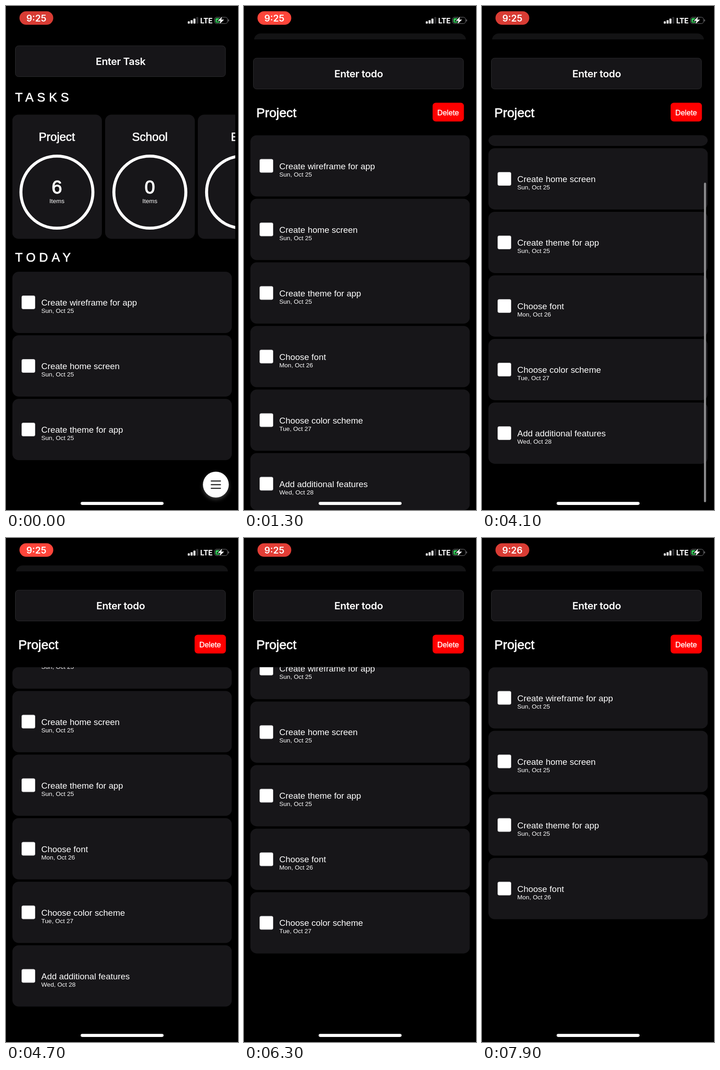
Recreate the animation shown at these times as an HTML page with a canvas. Size 508 by 1102 pixels, loop 8000 ms.

```html
<!DOCTYPE html>
<html lang="en">
<head>
<meta charset="utf-8">
<title>Todo app</title>
<style>
html, body { margin: 0; width: 100%; height: 100%; overflow: hidden; background: #000; }
canvas { display: block; }
</style>
</head>
<body>
<canvas id="stage" width="508" height="1102"></canvas>
<script>
const W = 508, H = 1102, LOOP = 8000;
const ctx = document.getElementById('stage').getContext('2d');
const SANS = '"Liberation Sans", Arial, sans-serif';
const UI = 'Inter, sans-serif';
const PANEL = '#171619', WHITE = '#fff';
const LIST_TOP = 282.5, PITCH = 139, MAX_SCROLL = 87, PEAK_SCROLL = 112;
const MODAL_TOP = 73;

const todos = [
  ['Create wireframe for app', 'Sun, Oct 25'],
  ['Create home screen', 'Sun, Oct 25'],
  ['Create theme for app', 'Sun, Oct 25'],
  ['Choose font', 'Mon, Oct 26'],
  ['Choose color scheme', 'Tue, Oct 27'],
  ['Add additional features', 'Wed, Oct 28']
];
// Start time of each row's swipe, by row index
const swipeStart = { 5: 6000, 4: 7350 };
const SWIPE_TIME = 300;

const progress = (t, from, to) => Math.min(1, Math.max(0, (t - from) / (to - from)));
const easeOut = (p, power = 3) => 1 - (1 - p) ** power;
const easeInOut = p => p * p * (3 - 2 * p);
const mix = (a, b, p) => a + (b - a) * p;

function box(x, y, w, h, r, fill, stroke) {
  ctx.beginPath();
  ctx.roundRect(x, y, w, h, r);
  if (fill) { ctx.fillStyle = fill; ctx.fill(); }
  if (stroke) { ctx.strokeStyle = stroke; ctx.lineWidth = 1; ctx.stroke(); }
}

function clipBox(x, y, w, h, r) {
  ctx.beginPath();
  ctx.roundRect(x, y, w, h, r);
  ctx.clip();
}

// `heavy` is the outline width that turns regular type into medium
function text(str, x, y, size, { align = 'left', heavy = 0, spacing = 0, font = SANS, weight = 400 } = {}) {
  ctx.font = `${weight} ${size}px ${font}`;
  ctx.textAlign = align;
  ctx.letterSpacing = spacing + 'px';
  ctx.fillStyle = ctx.strokeStyle = WHITE;
  ctx.fillText(str, x, y);
  if (heavy) {
    ctx.lineWidth = heavy;
    ctx.lineJoin = 'round';
    ctx.strokeText(str, x, y);
  }
  ctx.letterSpacing = '0px';
}

function inputButton(label, y) {
  box(20.5, y + 0.5, 460, 67.5, 7, '#161518', '#2b2b2d');
  text(label, 251, y + 42.7, 22, { align: 'center', font: UI, weight: 600, spacing: -0.3 });
}

function todoCard([title, date], y, x = 14) {
  box(x, y, 480.5, 134, 14, PANEL);
  box(x + 20.5, y + 52.5, 29, 29, 3, WHITE, '#c9c9cb');
  text(title, x + 63.3, y + 74, 18.96);
  text(date, x + 63.3, y + 90, 13.55);
}

function categoryCard(name, count, x) {
  const cx = x + 98;
  box(x, 237.5, 196.5, 271.5, 14, PANEL);
  text(name, cx, 294.5, 25.5, { align: 'center', heavy: 0.7 });
  ctx.beginPath();
  ctx.arc(cx, 407, 78.8, 0, Math.PI * 2);
  ctx.strokeStyle = WHITE;
  ctx.lineWidth = 6.6;
  ctx.stroke();
  text(count, cx, 409.5, 41, { align: 'center', heavy: 1.3 });
  text('Items', cx, 431, 13.55, { align: 'center' });
}

function menuButton() {
  ctx.save();
  ctx.shadowColor = 'rgba(255,255,255,0.25)';
  ctx.shadowBlur = 8;
  ctx.shadowOffsetY = 4;
  ctx.beginPath();
  ctx.arc(459.5, 1046.5, 28.3, 0, Math.PI * 2);
  ctx.fillStyle = WHITE;
  ctx.fill();
  ctx.restore();
  for (let i = 0; i < 3; i++) box(448.5, 1037.5 + i * 8, 22, 2.2, 0, '#111');
}

function home() {
  inputButton('Enter Task', 86.5);
  text('TASKS', 20, 209, 27, { heavy: 0.7, spacing: 7.8 });
  ctx.save();
  clipBox(14, 230, 488, 290, 0);
  categoryCard('Project', '6', 13.5);
  categoryCard('School', '0', 217);
  categoryCard('East', '0', 420);
  ctx.restore();
  text('TODAY', 20, 559, 27, { heavy: 0.7, spacing: 7.8 });
  todos.slice(0, 3).forEach((todo, i) => todoCard(todo, 581 + i * PITCH));
  menuButton();
}

function scrollAt(t) {
  if (t < 4050) return PEAK_SCROLL * easeInOut(progress(t, 3650, 4050));
  if (t < 6200) return mix(PEAK_SCROLL, MAX_SCROLL, easeInOut(progress(t, 4050, 4400)));
  return MAX_SCROLL * (1 - easeInOut(progress(t, 6200, 6500)));
}

function scrollBar(t, scroll) {
  const alpha = Math.min(progress(t, 3650, 3750), 1 - progress(t, 4300, 4490));
  if (alpha <= 0) return;
  const view = H - LIST_TOP, ratio = 799 / (view + MAX_SCROLL);
  const over = Math.max(0, scroll - MAX_SCROLL);
  const top = 286 + (scroll - over) * ratio + over;
  ctx.globalAlpha = alpha;
  box(486, top, 4.6, view * ratio - over, 2.3, '#8b8b8d');
  ctx.globalAlpha = 1;
}

function todoList(t) {
  const scroll = scrollAt(t);
  ctx.save();
  clipBox(14, LIST_TOP, 480.5, H - LIST_TOP, 13);
  todos.forEach((todo, i) => {
    const start = swipeStart[i] ?? Infinity;
    if (t >= start + SWIPE_TIME + 50) return;
    const swipe = start < t ? progress(t, start, start + SWIPE_TIME) : 0;
    todoCard(todo, LIST_TOP + i * PITCH - scroll, 14 - 481 * swipe * swipe);
  });
  scrollBar(t, scroll);
  ctx.restore();
}

function modal(t) {
  box(0, MODAL_TOP, W, H, [14, 14, 0, 0], '#000');
  inputButton('Enter todo', 113.5);
  text('Project', 27, 242.5, 28.2, { heavy: 0.8 });
  box(413, 211.5, 68.5, 41, 7, '#f00');
  text('Delete', 447, 238.5, 16.4, { align: 'center', heavy: 0.4 });
  todoList(t);
}

function screens(t) {
  const open = easeOut(progress(t, 400, 1050), 4);
  const scale = mix(1, 0.9134, open);
  ctx.save();
  ctx.translate(W / 2 * (1 - scale), 60 * open);
  ctx.scale(scale, scale);
  clipBox(0, 0, W, H, 16 * open);
  if (open < 1) home();
  ctx.fillStyle = `rgba(235,235,255,${0.078 * open})`;
  ctx.fillRect(0, 0, W, H);
  ctx.restore();
  if (open > 0) {
    ctx.save();
    ctx.translate(0, (H - MODAL_TOP) * (1 - open));
    modal(t);
    ctx.restore();
  }
}

function battery() {
  box(456.5, 24.5, 28.5, 14, 4.5, null, '#77777a');
  box(458.5, 26.5, 14, 10, 2.5, '#35c759');
  box(486.5, 29, 1.8, 5, [0, 2, 2, 0], '#77777a');
  ctx.beginPath();
  [[473.5, 23], [463.5, 32.5], [469.5, 32.5], [467.5, 39.5], [477.5, 29.8], [471.3, 29.8]]
    .forEach(([x, y]) => ctx.lineTo(x, y));
  ctx.closePath();
  ctx.strokeStyle = '#000';
  ctx.lineWidth = 2.5;
  ctx.stroke();
  ctx.fillStyle = WHITE;
  ctx.fill();
}

function statusBar(t) {
  const glow = Math.min(1, (1 - Math.cos(t / 1000 * Math.PI)) * 0.63);
  const [r, g, b] = [mix(216, 255, glow), mix(60, 69, glow), mix(52, 58, glow)];
  box(29.5, 11.5, 74, 29.5, 14.7, `rgb(${r},${g},${b})`);
  text(t < 7300 ? '9:25' : '9:26', 66.5, 33.5, 20, { align: 'center', font: UI, weight: 600 });
  [5, 7.5, 11, 14.5].forEach((h, i) =>
    box(398 + i * 6.2, 38.5 - h, 4.4, h, 1.2, i < 3 ? WHITE : '#303032'));
  text('LTE', 425.3, 38, 16.5, { font: 'Roboto, sans-serif', weight: 600 });
  battery();
}

function draw(t) {
  ctx.fillStyle = '#000';
  ctx.fillRect(0, 0, W, H);
  screens(t);
  statusBar(t);
  box(163.5, 1084.3, 181.5, 6.6, 3.3, WHITE);
}

function tick() {
  draw(performance.now() % LOOP);
  requestAnimationFrame(tick);
}
tick();
</script>
</body>
</html>
```
